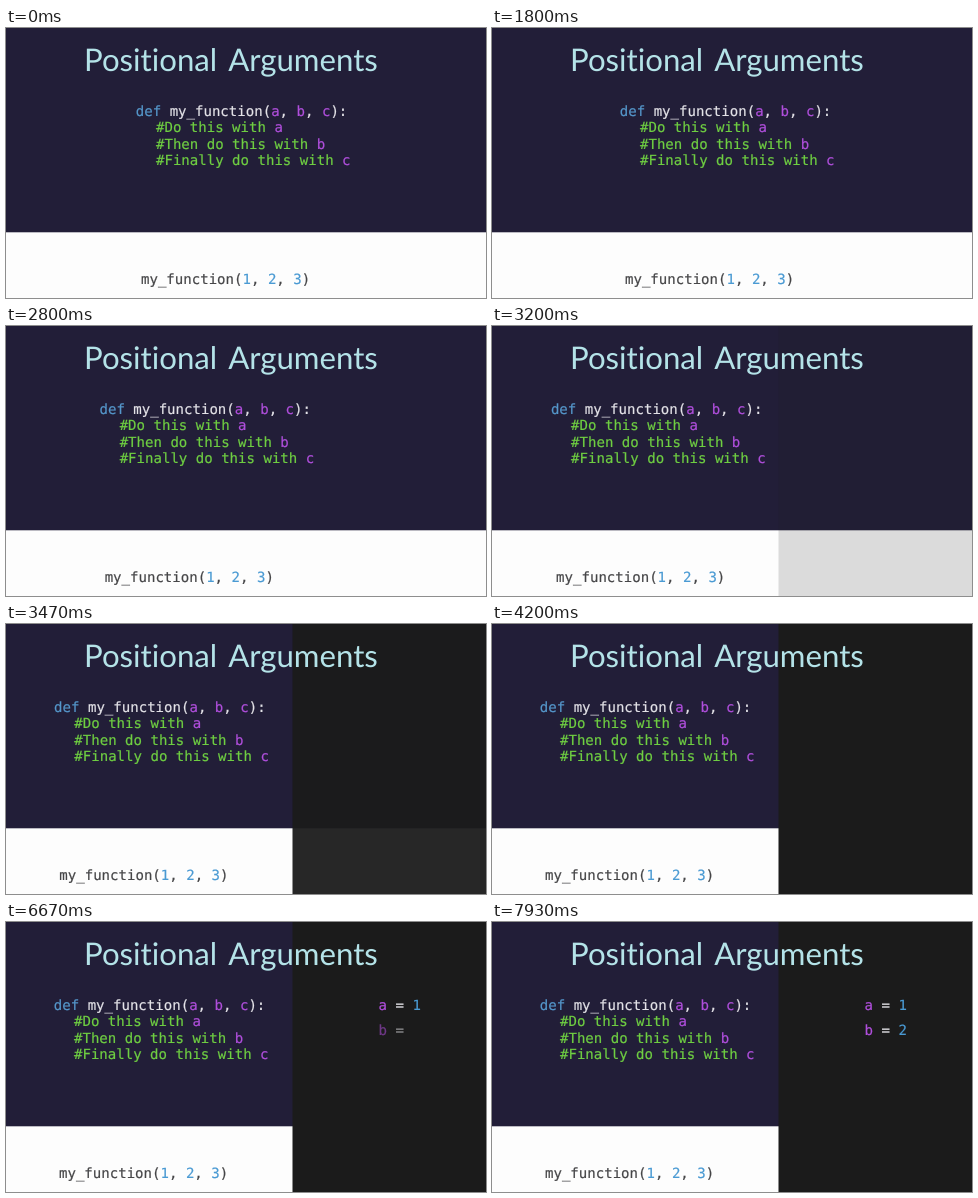
Recreate the animation shown at these times as an HTML page. Size 480 by 270 pixels, loop 8000 ms.

```html
<!DOCTYPE html>
<html lang="en">
<head>
<meta charset="utf-8">
<title>Positional Arguments</title>
<style>
  html, body { margin: 0; width: 100%; height: 100%; overflow: hidden; background: #221e38; }
  svg { display: block; width: 100%; height: 100%; }
  text {
    white-space: pre; font: 14.06px "DejaVu Sans Mono", monospace; text-rendering: geometricPrecision;
    color: #e4e3e8; stroke-width: 0.2px;
  }
  text, tspan { fill: currentColor; stroke: currentColor; }
  .title { font: 31.2px Lato, sans-serif; font-variant-ligatures: none; color: #b4e3e8; stroke-width: 0; }
  .key { color: #5597cb; }
  .arg { color: #b04fdc; }
  .note { color: #6fcf42; }
  .call { color: #454547; }
  .num { color: #4a9ad3; }
</style>
</head>
<body>
<svg viewBox="0 0 480 270">
  <rect width="480" height="270" fill="#221e38"/>
  <rect y="204.3" width="480" height="66" fill="#fdfdfd"/>
  <rect id="panel" x="286.5" width="194" height="270" fill="#1b1b1b"/>
  <text class="title" y="42.7"><tspan x="78">Positional</tspan><tspan x="222.2">Arguments</tspan></text>
  <g id="code">
    <text x="129.8" y="88"><tspan class="key">def</tspan> my_function(<tspan class="arg">a</tspan>, <tspan class="arg">b</tspan>, <tspan class="arg">c</tspan>):</text>
    <text class="note" x="150" y="104.3">#Do this with <tspan class="arg">a</tspan></text>
    <text class="note" x="150" y="120.6">#Then do this with <tspan class="arg">b</tspan></text>
    <text class="note" x="150" y="137">#Finally do this with <tspan class="arg">c</tspan></text>
    <text class="call" x="135" y="256">my_function(<tspan class="num">1</tspan>, <tspan class="num">2</tspan>, <tspan class="num">3</tspan>)</text>
  </g>
  <text id="nameA" x="372.5" y="88"><tspan class="arg">a</tspan> =</text>
  <text id="valueA" class="num" x="406.4" y="88">1</text>
  <text id="nameB" x="372.5" y="112.5"><tspan class="arg">b</tspan> =</text>
  <text id="valueB" class="num" x="406.4" y="112.5">2</text>
</svg>
<script>
  const LOOP = 8000, FADE = 340;
  const fadeStarts = { panel: 3150, nameA: 4350, valueA: 5130, nameB: 6480, valueB: 7220 };
  const byId = id => document.getElementById(id);
  const progress = (t, start, duration) => Math.min(1, Math.max(0, (t - start) / duration));
  const easeInOut = u => (1 - Math.cos(Math.PI * u)) / 2;

  function draw(t) {
    // A slight drift comes before the main slide to the left.
    const drift = 2 * progress(t, 1000, 800);
    const slide = 82 * easeInOut(progress(t, 2175, 1350));
    byId("code").setAttribute("transform", `translate(${-Math.max(drift, slide)} 0)`);
    for (const [id, start] of Object.entries(fadeStarts)) {
      byId(id).setAttribute("opacity", progress(t, start, FADE));
    }
  }

  const begin = performance.now();
  function tick() {
    draw((performance.now() - begin) % LOOP);
    requestAnimationFrame(tick);
  }
  tick();
</script>
</body>
</html>
```
